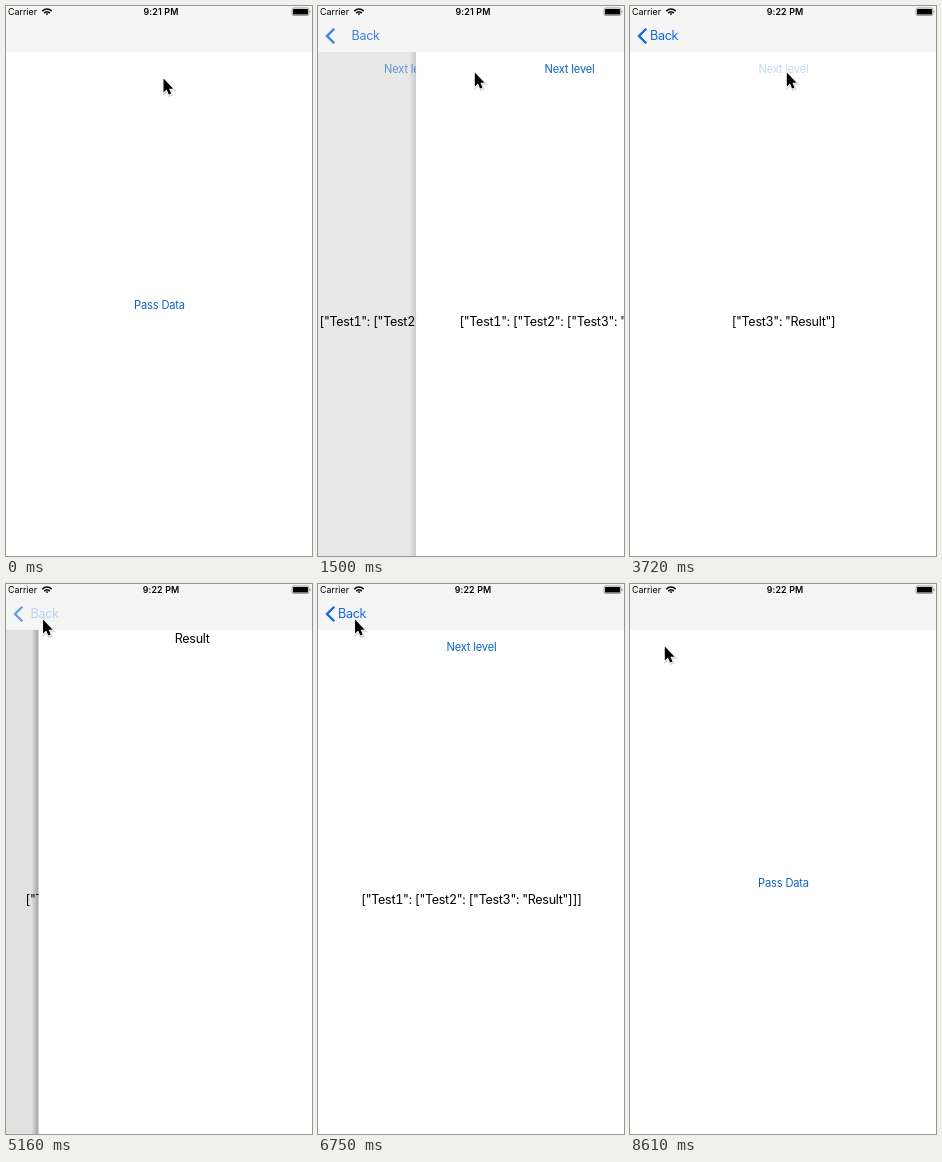
Write an HTML page that moves like this. It is 306 by 550 pixels and loops after 8.64 s.

```html
<!DOCTYPE html>
<html lang="en">
<head>
<meta charset="utf-8">
<title>Nested navigation</title>
<style>
  html, body { margin: 0; width: 100%; height: 100%; overflow: hidden; background: #fff; }
  svg { display: block; width: 306px; height: 550px; font-family: Inter, "Liberation Sans", sans-serif; }
  .label, .back { font-size: 12.57px; letter-spacing: -.3px; white-space: pre; }
  .label { font-variant-numeric: tabular-nums; }
  .label, .link { text-anchor: middle; }
  .link { font-size: 11.1px; letter-spacing: -.17px; fill: #0a64c4; }
  .back { fill: #1068e0; }
  .status { font-size: 8.87px; }
  #clock { font-weight: 600; letter-spacing: .15px; text-anchor: middle; }
</style>
</head>
<body>
<svg viewBox="0 0 306 550">
  <defs>
    <linearGradient id="shade">
      <stop offset="0" stop-opacity="0"/>
      <stop offset="1" stop-opacity=".4"/>
    </linearGradient>
    <path id="arrow" d="M0 0V15L3.4 11.9L5.7 17.2L8.3 16.1L6 10.9H10.5Z"/>
  </defs>
  <g id="stack"></g>
  <rect width="306" height="46" fill="#f5f5f5"/>

  <text class="status" x="2" y="9">Carrier</text>
  <g fill="none" stroke="#000" stroke-width="1.6">
    <path d="M36.3 5.2Q41 .8 45.7 5.2M38.2 7.1Q41 4.4 43.8 7.1"/>
    <path d="M39.6 7.8Q41 6.6 42.4 7.8L41 9.3Z" fill="#000" stroke="none"/>
  </g>
  <text class="status" id="clock" x="155" y="9"></text>
  <rect x="286" y="2" width="17" height="7.5" rx="1.6" fill="none" stroke="#777" stroke-width=".7"/>
  <rect x="287" y="3" width="15" height="5.5" rx=".6"/>
  <path d="M303.8 4.5q1.2 1.2 0 2.5z"/>

  <path id="chevron" d="M16.3 22.8L9 30L16.3 37.2" fill="none" stroke="#1068e0" stroke-width="2.3"/>
  <text class="back" id="backLow" y="34.3">Back</text>
  <text class="back" id="backTop" y="34.3">Back</text>

  <g id="cursor">
    <g transform="scale(.93)">
      <use href="#arrow" x=".6" y="1.2" fill="none" stroke="#000" stroke-opacity=".18" stroke-width="2.4"/>
      <use href="#arrow" stroke="#fff" stroke-width="1.7" paint-order="stroke"/>
    </g>
  </g>
</svg>
<script>
const LOOP = 8640, W = 306, PUSHES = 5;
const $ = id => document.getElementById(id);
const clamp = v => Math.max(0, Math.min(1, v));

// [press, slide start, slide end]: five pushes, then five pops
const slides = [
  [450, 460, 810], [1350, 1384, 1770], [2160, 2180, 2550], [2940, 2950, 3270], [3720, 3725, 4050],
  [4950, 5131, 5550], [5730, 5765, 6150], [6330, 6365, 6750], [7050, 7065, 7410], [7560, 7590, 7980]
];

// [time, x, y] of the pointer tip
const pointer = [
  [0, 157.5, 72.5], [270, 156.8, 68], [450, 156.8, 68], [510, 156.8, 66.5], [4320, 156.8, 66.5],
  [4770, 37, 38], [4950, 37, 38], [5100, 37, 35.5], [8160, 37, 35.5], [8610, 34.8, 62.5], [LOOP, 34.8, 62.5]
];

function nested(keys) {
  return keys.reduceRight((inner, key) => `["${key}": ${inner}]`, '"Result"');
}

const keys = ["Test", "Test1", "Test2", "Test3"];
const text = (cls, y, s) => `<text class="${cls}" x="153.5" y="${y}">${s}</text>`;
const contents = [
  text("link", 303, "Pass Data"),
  ...keys.map((_, i) => text("link", 67, "Next level") + text("label", 319.7, nested(keys.slice(i)))),
  text("label", 58.7, "Result")
];
$("stack").innerHTML = contents.map(c => `<g>
  <rect class="shadow" x="-7" y="46" width="7" height="504" fill="url(#shade)"/>
  <rect y="46" width="306" height="504" fill="#fff"/>
  <rect class="dim" y="46" width="306" height="504"/>${c}</g>`).join("");
const screens = [...$("stack").children].map(g => ({
  g, shadow: g.querySelector(".shadow"), dim: g.querySelector(".dim"), link: g.querySelector(".link")
}));

// Critically damped spring, scaled to arrive exactly at u = 1
const settle = u => 1 - (1 + 7.7 * u) * Math.exp(-7.7 * u);
const spring = u => settle(clamp(u)) / settle(1);

function set(el, x, opacity) {
  el.setAttribute("transform", `translate(${x} 0)`);
  el.setAttribute("opacity", opacity);
}

function place(screen, x, dim, shadow) {
  screen.g.style.display = "";
  set(screen.g, x, 1);
  screen.dim.setAttribute("opacity", dim);
  screen.shadow.setAttribute("opacity", shadow);
  screen.link?.setAttribute("opacity", 1);
}

function movePointer(t) {
  const i = pointer.findIndex(k => k[0] > t);
  const [t0, x0, y0] = pointer[i - 1], [t1, x1, y1] = pointer[i];
  const u = (t - t0) / (t1 - t0), e = u * u * (3 - 2 * u);
  $("cursor").setAttribute("transform", `translate(${x0 + (x1 - x0) * e} ${y0 + (y1 - y0) * e})`);
}

function render(t) {
  const n = slides.filter(s => s[0] <= t).length;
  const [, start, end] = slides[n - 1] || [0, 0, 0];
  const active = t < end, pop = n > PUSHES;
  const depth = pop ? 2 * PUSHES - n : n;
  const low = active && !pop ? depth - 1 : depth;
  const p = spring((t - start) / (end - start || 1));
  const cover = active ? (pop ? 1 - p : p) : 0;

  screens.forEach(s => s.g.style.display = "none");
  place(screens[low], -.3 * W * cover, .13 * cover, 0);
  if (active) {
    place(screens[low + 1], W * (1 - cover), 0, cover ** 3);
    if (!pop) screens[low].link.setAttribute("opacity", .25 + .75 * clamp((t - start) / 240));
  }

  set($("backLow"), 20 - 60 * cover, low ? clamp(1 - 2 * cover) : 0);
  set($("backTop"), 20 + 42 * (1 - cover), clamp(1.2 * cover) * (pop ? .25 : 1));
  let chevron = 1;
  if (active) chevron = pop ? .2 + .8 * clamp((t - start) / 55) : 1 - .2 * Math.sin(Math.PI * p);
  set($("chevron"), 0, chevron * (low ? 1 : cover));

  $("clock").textContent = t < 1620 ? "9:21 PM" : "9:22 PM";
  movePointer(t);
}

const begin = performance.now();
function frame() {
  render((performance.now() - begin) % LOOP);
  requestAnimationFrame(frame);
}
frame();
</script>
</body>
</html>
```
